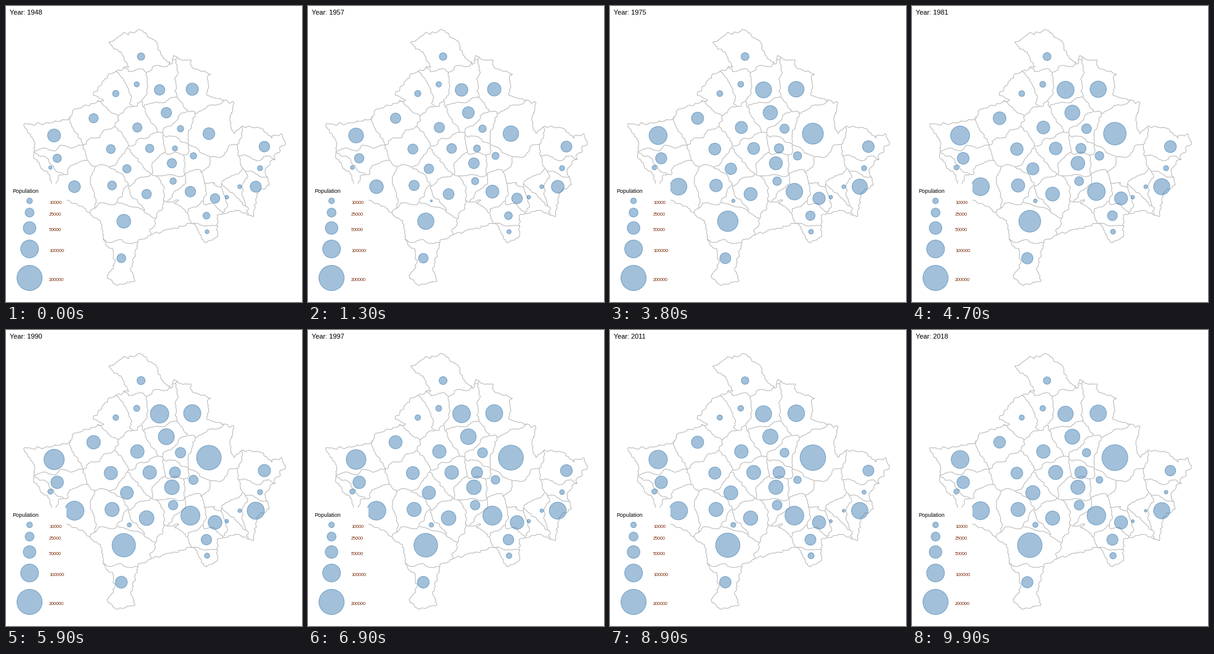
Recreate the animation shown at these times as a matplotlib script. Size 480 by 480 pixels, loop 10 s.

```python
import matplotlib.pyplot as plt
import numpy as np
from matplotlib.animation import FuncAnimation
from matplotlib.patches import Circle, Polygon, Rectangle

SIZE, DPI, FRAMES, STEP = 480, 100, 100, 100
PEAK = 59
BLUE = np.array([70, 130, 180]) / 255
GREY = "#b4b4b4"

fig = plt.figure(figsize=(SIZE / DPI, SIZE / DPI), dpi=DPI, facecolor="white")
ax = fig.add_axes([0, 0, 1, 1])
ax.set_xlim(0, SIZE)
ax.set_ylim(SIZE, 0)
ax.axis("off")


def px(n):
    return n * 72 / DPI


def rough(x, y, longest):
    """Shift points by a sum of random waves, for rugged lines."""
    rng = np.random.default_rng(5)
    dx = dy = 0
    for wave in np.geomspace(longest, 5, 12):
        turn, p, q = rng.uniform(0, 2 * np.pi, 3)
        s = 2 * np.pi / wave * (x * np.cos(turn) + y * np.sin(turn))
        dx = dx + 0.04 * wave * np.sin(s + p)
        dy = dy + 0.04 * wave * np.sin(s + q)
    return x + dx, y + dy


def bubble(x, y, r, z):
    return ax.add_patch(Circle((x, y), r, fc=(*BLUE, 0.5), ec=(*BLUE, 0.65),
                               lw=px(1), zorder=z))


def label(x, y, text, size, color="black"):
    return ax.text(x, y, text, fontsize=px(size), color=color, zorder=5,
                   family="Liberation Sans")


towns = []


def town(x, y, first, peak, last):
    """Place a town with its first, highest and last bubble radius."""
    towns.append((bubble(x, y, first, 2), (first, peak, last)))


town(219, 82, 6, 6.6, 6)
town(212, 127, 4.2, 5, 4.5)
town(178, 142, 5.2, 4.6, 4.2)
town(249, 136, 8.5, 15, 12.5)
town(302, 135, 10, 14, 13.4)
town(260, 173, 8.5, 13, 12.2)
town(142, 182, 7.5, 11, 9.6)
town(213, 197, 7.5, 11, 11)
town(283, 199, 5.2, 8.5, 6.8)
town(329, 207, 9.6, 20, 21)
town(78, 210, 10.5, 16.5, 14.5)
town(83, 247, 6.8, 10.2, 10.2)
town(72, 262, 2.8, 4.2, 4.2)
town(111, 293, 9.6, 15.5, 14.6)
town(170, 232, 7.2, 10.8, 9.6)
town(196, 264, 6.8, 10.5, 11.6)
town(172, 291, 7.2, 11.5, 11.5)
town(233, 231, 6.8, 11, 11.5)
town(274, 231, 4.2, 9, 10)
town(304, 243, 5.2, 7.5, 5.5)
town(269, 255, 7.6, 12, 11.5)
town(271, 284, 5.2, 7.7, 8)
town(228, 305, 7.7, 12, 11.5)
town(299, 301, 8.6, 15.5, 15.2)
town(339, 312, 7.7, 11.2, 10.7)
town(358, 310, 3, 3, 2.4)
town(379, 293, 3.2, 3, 2.2)
town(405, 293, 9, 14, 13.2)
town(412, 263, 4.2, 4.2, 3)
town(419, 228, 8.6, 10, 8.6)
town(325, 340, 5.6, 8.5, 9.1)
town(326, 366, 3.2, 4.2, 5.2)
town(191, 349, 11.2, 19, 20)
town(187, 409, 7.2, 9.7, 9.2)
town(200, 316, 0, 3.4, 4.2)
town(277, 340, 0, 0, 0)
town(352, 264, 0, 0, 0)

# coast of the map, through a few corners
corners = [(168, 60), (190, 45), (219, 40), (245, 58), (251, 80), (268, 96),
           (272, 81), (286, 88), (298, 88), (303, 102), (329, 109), (327, 145),
           (369, 157), (363, 190), (369, 206), (384, 195), (411, 197),
           (430, 212), (446, 208), (454, 220), (420, 266), (427, 290),
           (407, 303), (401, 341), (372, 331), (343, 340), (343, 375),
           (322, 384), (305, 352), (243, 368), (215, 381), (203, 425),
           (208, 447), (178, 452), (163, 440), (175, 422), (175, 400),
           (158, 380), (155, 350), (118, 323), (78, 305), (72, 278), (44, 245),
           (47, 222), (28, 192), (63, 191), (105, 182), (108, 169), (158, 152),
           (141, 144), (167, 111), (198, 99), (188, 78), (168, 60)]
cx, cy = np.array(corners, float).T
along = np.r_[0, np.cumsum(np.hypot(np.diff(cx), np.diff(cy)))]
t = np.arange(0, along[-1], 1.5)
coast = np.column_stack(rough(np.interp(t, along, cx), np.interp(t, along, cy), 16))
land = ax.add_patch(Polygon(coast, fc="none", ec=GREY, lw=px(1), zorder=1))

# inner borders: each town holds the land nearest to it, bigger towns reach further
gx, gy = np.meshgrid(np.arange(SIZE), np.arange(SIZE))
wx, wy = rough(gx, gy, 60)
reach = np.array([(wx - dot.center[0]) ** 2 + (wy - dot.center[1]) ** 2
                  - 1.5 * radii[-1] ** 2 for dot, radii in towns])
owner = reach.argmin(axis=0)
for i in range(len(towns) - 1):
    gap = reach[i] - reach[i + 1:].min(axis=0)
    lines = ax.contour(gx, gy, np.where(owner < i, np.nan, gap), [0],
                       colors=GREY, linewidths=px(1), zorder=1)
    lines.set_clip_path(land)

# legend
ax.add_patch(Rectangle((0, 288), 98, 192, fc="white", ec="none", zorder=3))
label(10.5, 303, "Population", 9)
for count, y in zip((10000, 25000, 50000, 100000, 200000),
                    (316, 335, 360, 394, 441)):
    bubble(38.2, y, 0.0458 * count ** 0.5, 4)
    label(70, y + 4.6, str(count), 7.3, "#7a2a08")

title = label(6, 14, "", 11)


def draw(i):
    title.set_text(f"Year: {round(1948 + 70 * i / (FRAMES - 1))}")
    for dot, radii in towns:
        area = np.interp(i, (0, PEAK, FRAMES - 1), np.square(radii))
        dot.set_radius(area ** 0.5)
        dot.set_visible(area > 0.25)
    return [title] + [dot for dot, _ in towns]


anim = FuncAnimation(fig, draw, frames=FRAMES, interval=STEP, repeat=True,
                     repeat_delay=0)
plt.show()
```
